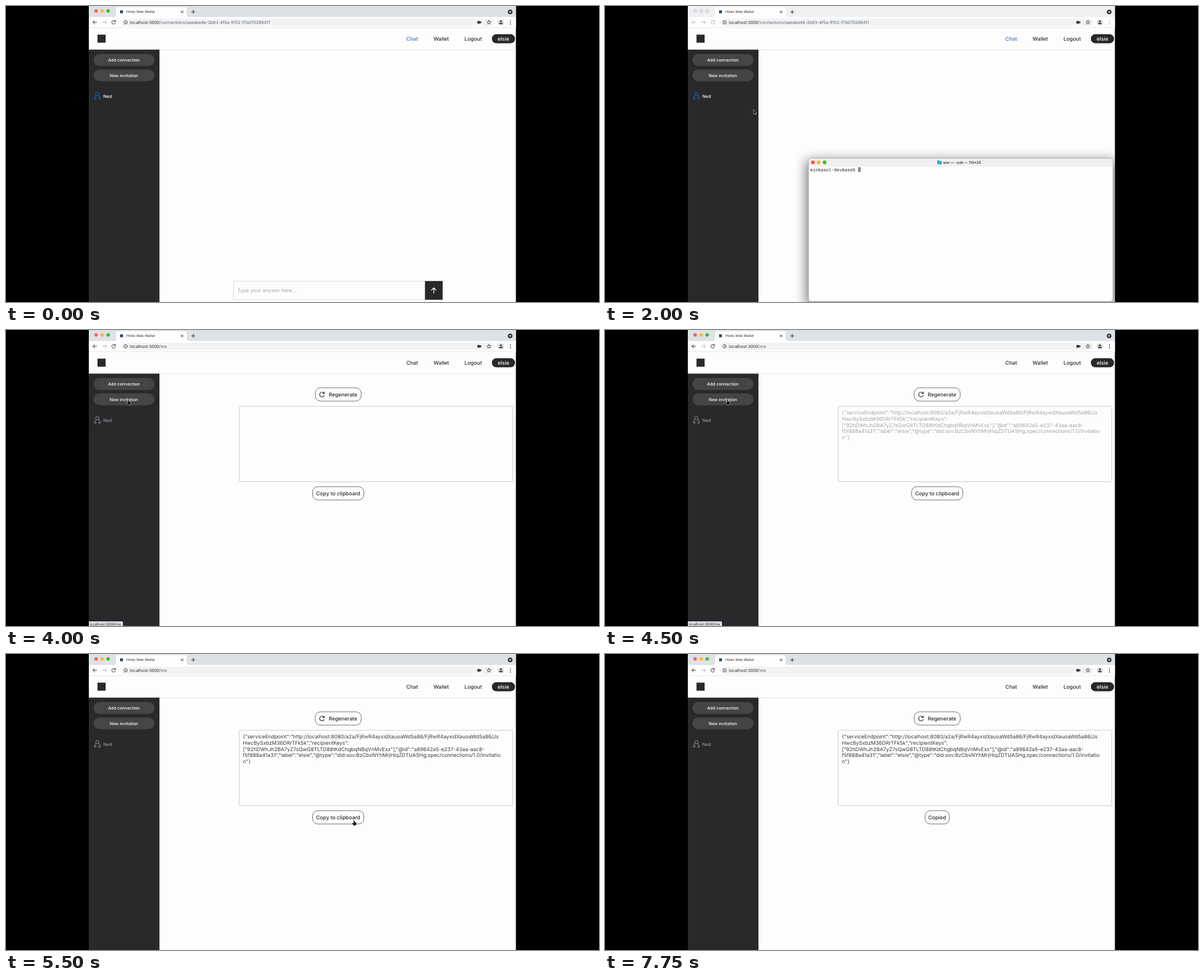
An HTML page that plays this animation: 1024 by 512 pixels, repeating every 8000 ms.

```html
<!DOCTYPE html>
<html lang="en">
<head>
<meta charset="utf-8">
<title>Web wallet</title>
<style>
  html, body { margin: 0; width: 100%; height: 100%; overflow: hidden; background: #000; }
  svg { display: block; width: 1024px; height: 512px; }
  text { font: 500 9px Inter, sans-serif; fill: #2a2a2d; text-rendering: geometricPrecision; white-space: pre; }
  .mid { text-anchor: middle; }
  .side { font-size: 7.25px; fill: #fff; }
  .url { font-size: 7.2px; font-weight: 400; }
  .url .path { fill: #5f6368; }
  .json text { font-size: 8.9px; font-weight: 400; fill: #3a3a3c; }
  .line { fill: none; stroke: #2f3033; stroke-width: 1; stroke-linecap: round; stroke-linejoin: round; }
  .button { fill: #fdfdfd; stroke: #4a4a50; stroke-width: .8; }
</style>
</head>
<body>
<svg viewBox="0 0 1024 512">
  <defs>
    <clipPath id="screen"><rect x="143" width="737.500" height="512"/></clipPath>
    <filter id="shadow" x="-20%" y="-20%" width="140%" height="150%"><feGaussianBlur stdDeviation="10"/></filter>
  </defs>
  <rect width="1024" height="512"/>
  <g clip-path="url(#screen)">
    <rect x="143" width="738" height="512" fill="#fdfdfd"/>

    <!-- browser frame -->
    <rect id="strip" x="143" width="738" height="19"/>
    <g id="lights"></g>
    <path d="M186 19q4 0 4-4V6q0-4 4-4H308q4 0 4 4v9q0 4 4 4z" fill="#fdfdfd"/>
    <rect x="197" y="7.5" width="5" height="5" fill="#2c4a68"/>
    <text x="208" y="12.3" style="font-size:6px;font-weight:400">Hirdo Web Wallet</text>
    <path class="line" d="M302.5 8.5l3.4 3.4m0-3.4l-3.4 3.4M320.3 10.2h6m-3-3v6"/>
    <circle cx="870.6" cy="10.2" r="4" fill="#35363a"/>
    <path d="M868.6 9.2h4l-2 2.7z" fill="#fff"/>
    <rect x="143" y="19" width="738" height="19" fill="#fdfdfd"/>
    <rect x="199" y="22" width="644" height="12.5" rx="6.2" fill="#f0f2f4"/>
    <g id="tools" class="line">
      <path d="M156.5 28.2h-6.5m3-3l-3 3 3 3M188.6 26.4a3.2 3.2 0 1 0 .4 2.6M189 24.6v2.3h-2.3"/>
      <circle cx="871" cy="25.3" r=".4"/><circle cx="871" cy="28.3" r=".4"/><circle cx="871" cy="31.3" r=".4"/>
    </g>
    <path class="line" d="M167 28.2h6.5m-3-3l3 3-3 3" style="stroke:#b4b6ba"/>
    <circle class="line" cx="206.5" cy="28.2" r="3" style="stroke-width:.8"/>
    <path class="line" d="M206.5 28v1.8m0-3.2v.1" style="stroke-width:.8"/>
    <text class="url" x="214" y="30.7">localhost:3000<tspan class="path" id="path"></tspan></text>
    <path d="M814 26h4.8v1.3l2-1.1v4l-2-1.1v1.3H814z" fill="#35363a"/>
    <path class="line" d="M834 24.800l1 2.3 2.5.2-1.9 1.6.6 2.4-2.2-1.3-2.2 1.3.6-2.4-1.9-1.6 2.5-.2z" style="stroke-width:.8"/>
    <circle cx="854.6" cy="28.2" r="5.5" fill="#d8dade"/>
    <path d="M851.2 31.2q0-2.3 3.4-2.3t3.4 2.3z" fill="#35363a"/>
    <circle cx="854.6" cy="26.6" r="1.7" fill="#35363a"/>

    <!-- page header -->
    <rect x="143" y="37" width="738" height="1" fill="#e8e9eb"/>
    <rect x="158" y="49.5" width="14" height="14" fill="#2a2a2d"/>
    <text id="chat" x="691.3" y="59.9">Chat</text>
    <text x="738.3" y="59.9">Wallet</text>
    <text x="791.8" y="59.9">Logout</text>
    <rect x="839" y="48.8" width="40" height="15.8" rx="7.9" fill="#28282b"/>
    <text class="mid" x="859" y="59.9" style="fill:#fff">elsie</text>
    <rect x="143" y="75" width="738" height="1" fill="#e6e6e8"/>

    <!-- sidebar -->
    <rect x="143" y="75.5" width="122" height="437" fill="#29292c"/>
    <rect x="151" y="83" width="105.5" height="20.8" rx="10.4" fill="#454548"/>
    <rect x="151" y="109.7" width="105.5" height="20.5" rx="10.2" fill="#454548"/>
    <text class="mid side" x="203.6" y="96.1">Add connection</text>
    <text class="mid side" x="203.6" y="122.7">New invitation</text>
    <g id="person" class="line">
      <circle cx="157.7" cy="152.6" r="2.9"/>
      <path d="M155.5 154.900q-2.6 1.4-2.6 4.2v2h2.3v-2m5-4.2q2.5 1.4 2.5 4.2v2h-2.3v-2"/>
    </g>
    <text id="friend" x="168" y="158.9" style="font-size:7.6px">Ned</text>

    <!-- chat page -->
    <g id="chatPage">
      <rect x="393" y="476" width="331" height="32" fill="#fdfdfd" stroke="#dcdcde"/>
      <text x="399.5" y="495.4" style="font-size:8.7px;font-weight:400;fill:#a6a6a9">Type your answer here...</text>
      <rect x="723.5" y="475.7" width="30.5" height="32.5" fill="#29292c"/>
      <path class="line" d="M738.7 496.500v-9m-4 4l4-4 4 4" style="stroke:#fff;stroke-width:1.2"/>
    </g>

    <!-- invitation page -->
    <g id="invitePage">
      <rect class="button" x="534" y="100" width="79.3" height="23" rx="9"/>
      <path class="line" d="M548.9 109a4.1 4.1 0 1 0 .6 4.2M549.7 107v2.9h-2.9" style="stroke-width:1.2"/>
      <text x="557.2" y="114.7">Regenerate</text>
      <rect x="402.7" y="132" width="472.3" height="130.3" rx="2.5" fill="none" stroke="#c9cacd"/>
      <g id="json" class="json"></g>
      <rect id="copyBox" class="button" y="271" height="23" rx="9"/>
      <text id="copyText" class="mid" x="573.6" y="285.6"></text>
    </g>

    <g id="status">
      <path d="M143 504h57q2 0 2 2v6h-59z" fill="#dee1e6"/>
      <text x="144.5" y="510.6" style="font-size:6.1px;font-weight:400">localhost:3000/me</text>
    </g>

    <!-- terminal -->
    <g id="terminal">
      <rect x="347" y="266" width="534" height="254" rx="8" opacity=".5" filter="url(#shadow)"/>
      <rect x="351.5" y="263.5" width="525.5" height="247.5" rx="5" fill="#fdfdfd" stroke="#b4b4b6"/>
      <path d="M352 278v-9.5q0-4.5 4.5-4.5H872q4.5 0 4.5 4.5V278z" fill="#f1f0f1"/>
      <circle cx="359" cy="270.5" r="3.2" fill="#ff5548"/>
      <circle cx="369" cy="270.5" r="3.2" fill="#f7b32a"/>
      <circle cx="379.2" cy="270.5" r="3.2" fill="#38b935"/>
      <path d="M573.7 267h3l1 1h4v5.8h-8z" fill="#3aa6d0"/>
      <text x="584" y="272.7" style="font-size:6.3px;font-weight:600">env — -zsh — 113×25</text>
      <text x="354.3" y="286" style="font:400 7.62px 'DejaVu Sans Mono',monospace">minkasol-devbase$</text>
      <rect x="437" y="278.8" width="4.6" height="8.4" fill="#8a8a8c"/>
    </g>

    <g id="pointer" fill="#111" stroke="#fff" stroke-width="1" stroke-linejoin="round" paint-order="stroke">
      <path id="arrow" d="M0 0V7.2L1.7 5.7 2.9 8.3 4 7.8 2.9 5.3H5.2Z"/>
      <path id="hand" d="M-.8.8Q0-.4.8.8V3.2L4 4V6.5L3 9H-.8L-3.3 5.6Q-3.3 4.4-2.1 4.8L-.8 6Z"/>
    </g>
  </g>
</svg>
<script>
const LOOP = 8000, STEP = 250;
const $ = id => document.getElementById(id);
const show = (id, on) => $(id).style.display = on ? "" : "none";

function add(parent, tag, attrs, text = "") {
  const el = document.createElementNS("http://www.w3.org/2000/svg", tag);
  for (const k in attrs) el.setAttribute(k, attrs[k]);
  el.textContent = text;
  return parent.appendChild(el);
}

[
  '{"serviceEndpoint":"http://localhost:8080/a2a/FjRwR4ayxidXauoaWd5a86/FjRwR4ayxidXauoaWd5a86/Js',
  'HwcBySxbzM36DRrTFk5k","recipientKeys":',
  '["92hDWhJh2BA7yZ7sQwG8TLTD88tKdChgbqNBqVnMvExx"],"@id":"a89642a5-e237-43aa-aac8-',
  'f5f888a41a31","label":"elsie","@type":"did:sov:BzCbsNYhMrjHiqZDTUASHg;spec/connections/1.0/invitatio',
  'n"}'
].forEach((line, i) => add($("json"), "text", { x: 409, y: 146.2 + i * 10.7 }, line));

const lightColors = ["#ff5f55", "#f9bb2d", "#30c23c"];
const lights = lightColors.map((c, i) =>
  add($("lights"), "circle", { cx: 155.6 + i * 10.4, cy: 8.4, r: 3 }));

// pointer tip: time, x, y
const track = [
  [1500, 330, 232], [2000, 256.5, 179.5], [2500, 232, 145], [3250, 216.3, 121.5],
  [3500, 211.5, 120], [4500, 211.5, 120], [5000, 597, 325.5],
  [5250, 601, 288], [6000, 601, 286.5], [7000, 601, 286.5]
];

function pointerAt(t) {
  const i = track.findIndex(p => p[0] > t);
  if (i < 1) return null;
  const [t0, x0, y0] = track[i - 1], [t1, x1, y1] = track[i];
  const k = (t - t0) / (t1 - t0);
  return [x0 + (x1 - x0) * k, y0 + (y1 - y0) * k];
}

function draw(t) {
  const terminal = t >= 750 && t < 2500;
  const blurred = t >= 750 && t < 2750;
  const invite = t >= 4000;
  const copied = t >= 5750;

  $("strip").setAttribute("fill", blurred ? "#eef0f2" : "#dee1e6");
  $("tools").style.stroke = blurred ? "#b4b6ba" : "#2f3033";
  lights.forEach((el, i) => {
    el.setAttribute("fill", terminal ? "#e2e3e5" : lightColors[i]);
    el.setAttribute("stroke", terminal ? "#c8c9cc" : "none");
  });
  show("terminal", terminal);

  $("path").textContent = invite ? "/me" : "/connections/aaeabe4b-2b83-4f5a-9152-f7b070298411";
  $("chat").style.fill = invite ? "#2a2a2d" : "#3a78b8";
  $("person").style.stroke = invite ? "#9a9a9d" : "#1c70bd";
  $("friend").style.fill = invite ? "#9a9a9d" : "#fff";
  show("chatPage", !invite);
  show("invitePage", invite);
  show("status", t >= 3500 && t < 5250);

  $("json").style.opacity = Math.max(0, Math.min(1, (t - 4000) / 1100));
  const width = copied ? 42 : 88.5;
  $("copyBox").setAttribute("x", 573.7 - width / 2);
  $("copyBox").setAttribute("width", width);
  $("copyText").textContent = copied ? "Copied" : "Copy to clipboard";

  const tip = pointerAt(t), hand = t >= 3500 && !copied;
  show("pointer", tip);
  show("hand", hand);
  show("arrow", !hand);
  if (tip) $("pointer").setAttribute("transform", `translate(${tip})`);
}

function tick() {
  draw(Math.floor(performance.now() % LOOP / STEP) * STEP);
  requestAnimationFrame(tick);
}
tick();
</script>
</body>
</html>
```
